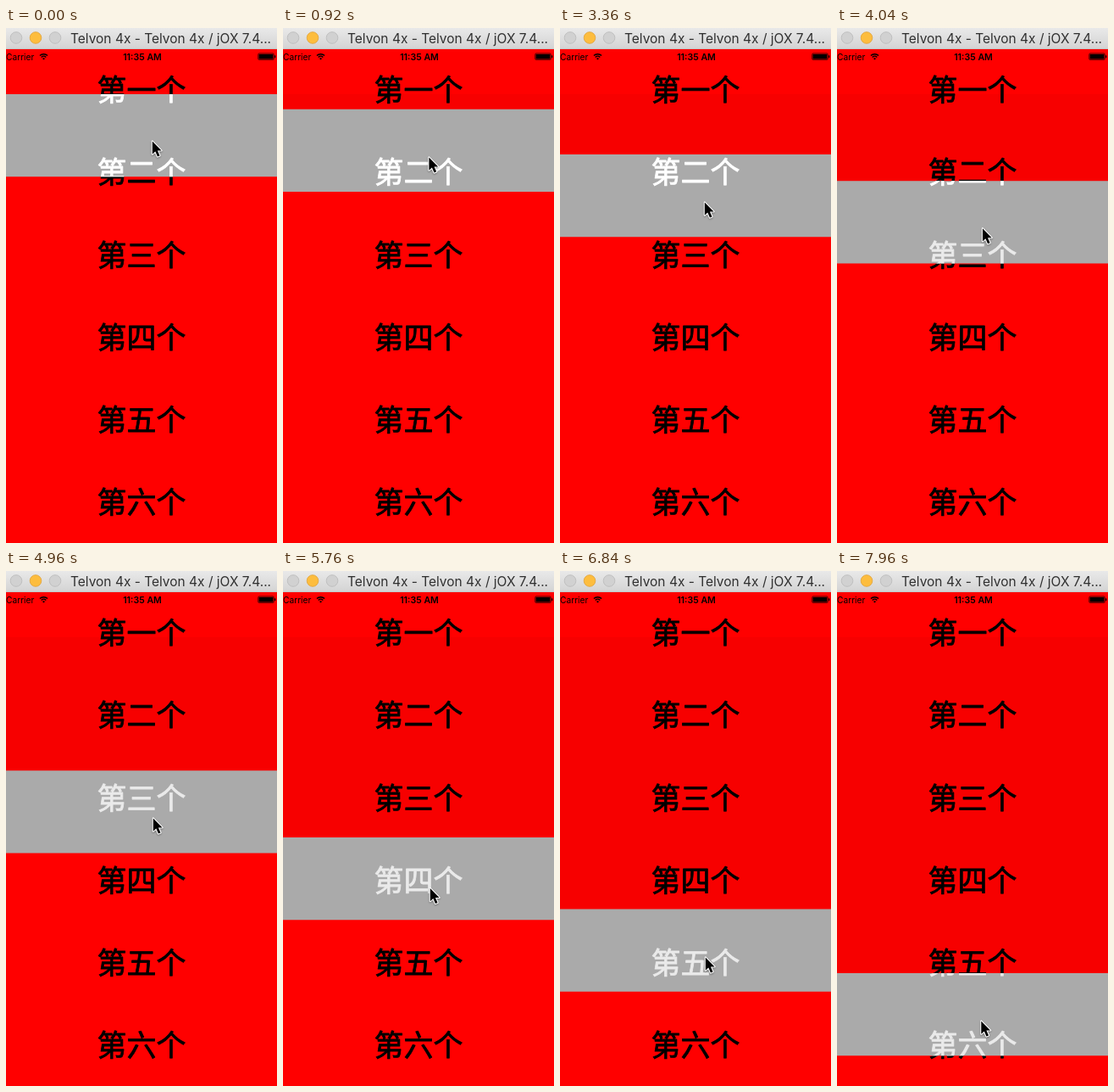
Write an HTML page with a canvas that moves like this. It is 320 px wide and 607 px high and loops after 8 s.

```html
<!DOCTYPE html>
<html lang="zh-CN">
<head>
<meta charset="utf-8">
<style>
  html, body { margin: 0; width: 100%; height: 100%; overflow: hidden; background: #f00; }
  canvas { display: block; width: 320px; height: 607px; }
</style>
</head>
<body>
<canvas></canvas>
<script>
const W = 320, H = 607, BAR = 25, ROW = 97.2;
const LOOP = 8000, STEP = 40;
const LABELS = ['第一个', '第二个', '第三个', '第四个', '第五个', '第六个'];
const UI = 'Inter, sans-serif';

// time, band top, pointer x, pointer y
const KEYS = [
  [0, 78, 172, 132],
  [2120, 119.8, 171, 176],
  [3360, 149, 170, 204],
  [4960, 235.2, 173, 290],
  [5760, 314, 173, 372.5],
  [6840, 398.5, 171, 454],
  [7960, 474, 169.5, 529]
];

const canvas = document.querySelector('canvas');
const ctx = canvas.getContext('2d');
const ratio = window.devicePixelRatio || 1;
canvas.width = W * ratio;
canvas.height = H * ratio;
ctx.scale(ratio, ratio);

function slope(i, column) {
  const a = KEYS[Math.max(i - 1, 0)], b = KEYS[Math.min(i + 1, KEYS.length - 1)];
  return (b[column] - a[column]) / (b[0] - a[0]);
}

// Cubic Hermite curve through the keys
function valueAt(time, column) {
  let i = 0;
  while (i < KEYS.length - 2 && time >= KEYS[i + 1][0]) i++;
  const a = KEYS[i], b = KEYS[i + 1], span = b[0] - a[0];
  const u = Math.min((time - a[0]) / span, 1), v = 1 - u;
  return v * v * (1 + 2 * u) * a[column] + u * u * (3 - 2 * u) * b[column]
    + span * u * v * (v * slope(i, column) - u * slope(i + 1, column));
}

function rect(color, x, y, w, h) {
  ctx.fillStyle = color;
  ctx.fillRect(x, y, w, h);
}

function text(string, x, y, font, color, align = 'left') {
  ctx.font = font;
  ctx.fillStyle = color;
  ctx.textAlign = align;
  ctx.fillText(string, x, y);
}

// A thin stroke gives the glyphs a medium weight
function drawLabels(colorOf) {
  ctx.lineWidth = 0.8;
  ctx.lineJoin = 'round';
  LABELS.forEach((label, i) => {
    const y = 86.2 + i * ROW;
    text(label, W / 2, y, '35px "Noto Sans CJK SC", "Noto Sans CJK", sans-serif', colorOf(i), 'center');
    ctx.strokeStyle = colorOf(i);
    ctx.strokeText(label, W / 2, y);
  });
}

function drawBand(top) {
  ctx.save();
  ctx.beginPath();
  ctx.rect(0, top, W, ROW);
  ctx.clip();
  rect('#aaa', 0, 0, W, H);
  drawLabels(i => i < 2 ? '#fff' : '#eaeaea');
  ctx.restore();
}

function drawTitleBar() {
  const shade = ctx.createLinearGradient(0, 0, 0, BAR);
  shade.addColorStop(0, '#e9e9e9');
  shade.addColorStop(1, '#d3d3d3');
  rect(shade, 0, 0, W, BAR);
  rect('#c4c4c4', 0, BAR - 1, W, 1);
  [['#d1d1d1', '#b9b9b9'], ['#fdbd3e', '#e0a136'], ['#d1d1d1', '#b9b9b9']].forEach(([fill, edge], i) => {
    ctx.beginPath();
    ctx.arc(12 + 23 * i, 11.5, 6.8, 0, 7);
    ctx.fillStyle = fill;
    ctx.fill();
    ctx.strokeStyle = edge;
    ctx.lineWidth = 0.8;
    ctx.stroke();
  });
  text('Telvon 4x - Telvon 4x / jOX 7.4...', 76, 18, '15.5px ' + UI, '#303030');
}

function drawBattery() {
  ctx.strokeStyle = '#000';
  ctx.lineWidth = 0.6;
  ctx.beginPath();
  ctx.roundRect(297.6, 29.9, 18.8, 7.6, 1.5);
  ctx.stroke();
  rect('#000', 298.5, 30.8, 17, 5.8);
  rect('#000', 317.2, 32.3, 1.2, 2.8);
}

function drawStatusBar() {
  text('Carrier', 0, 37.5, '10.2px ' + UI, '#000');
  text('11:35 AM', 161, 37.5, '600 10.6px ' + UI, '#000', 'center');
  ctx.strokeStyle = '#000';
  ctx.lineWidth = 1.4;
  [3.9, 6.5].forEach(r => {
    ctx.beginPath();
    ctx.arc(44.5, 37.2, r, -Math.PI * 0.75, -Math.PI * 0.25);
    ctx.stroke();
  });
  ctx.fillStyle = '#000';
  ctx.beginPath();
  ctx.moveTo(44.5, 37.5);
  ctx.arc(44.5, 37.5, 2.2, -Math.PI * 0.75, -Math.PI * 0.25);
  ctx.fill();
  drawBattery();
}

function drawPointer(x, y) {
  ctx.save();
  ctx.translate(x + 0.8, y + 1.5);
  ctx.scale(0.93, 0.93);
  const arrow = new Path2D('M0 0V16.4L3.8 12.9L6.6 19.4L9.4 18.2L6.6 11.8H11.6Z');
  ctx.lineJoin = 'round';
  ctx.lineWidth = 2.4;
  ctx.strokeStyle = '#fff';
  ctx.shadowColor = 'rgba(0,0,0,.35)';
  ctx.shadowBlur = 2 * ratio;
  ctx.shadowOffsetY = ratio;
  ctx.stroke(arrow);
  ctx.shadowColor = 'transparent';
  ctx.fillStyle = '#000';
  ctx.fill(arrow);
  ctx.restore();
}

function draw(now) {
  const time = Math.floor(now % LOOP / STEP) * STEP;
  const top = valueAt(time, 1), firstTop = KEYS[0][1];
  rect('#f00', 0, 0, W, H);
  // The band leaves a slightly darker red behind
  rect('#f70000', 0, firstTop, W, top - firstTop);
  drawLabels(() => '#000');
  drawBand(top);
  drawTitleBar();
  drawStatusBar();
  drawPointer(valueAt(time, 2), valueAt(time, 3));
}

let start;
function tick(now) {
  start ??= now;
  draw(now - start);
  requestAnimationFrame(tick);
}
requestAnimationFrame(tick);
</script>
</body>
</html>
```
